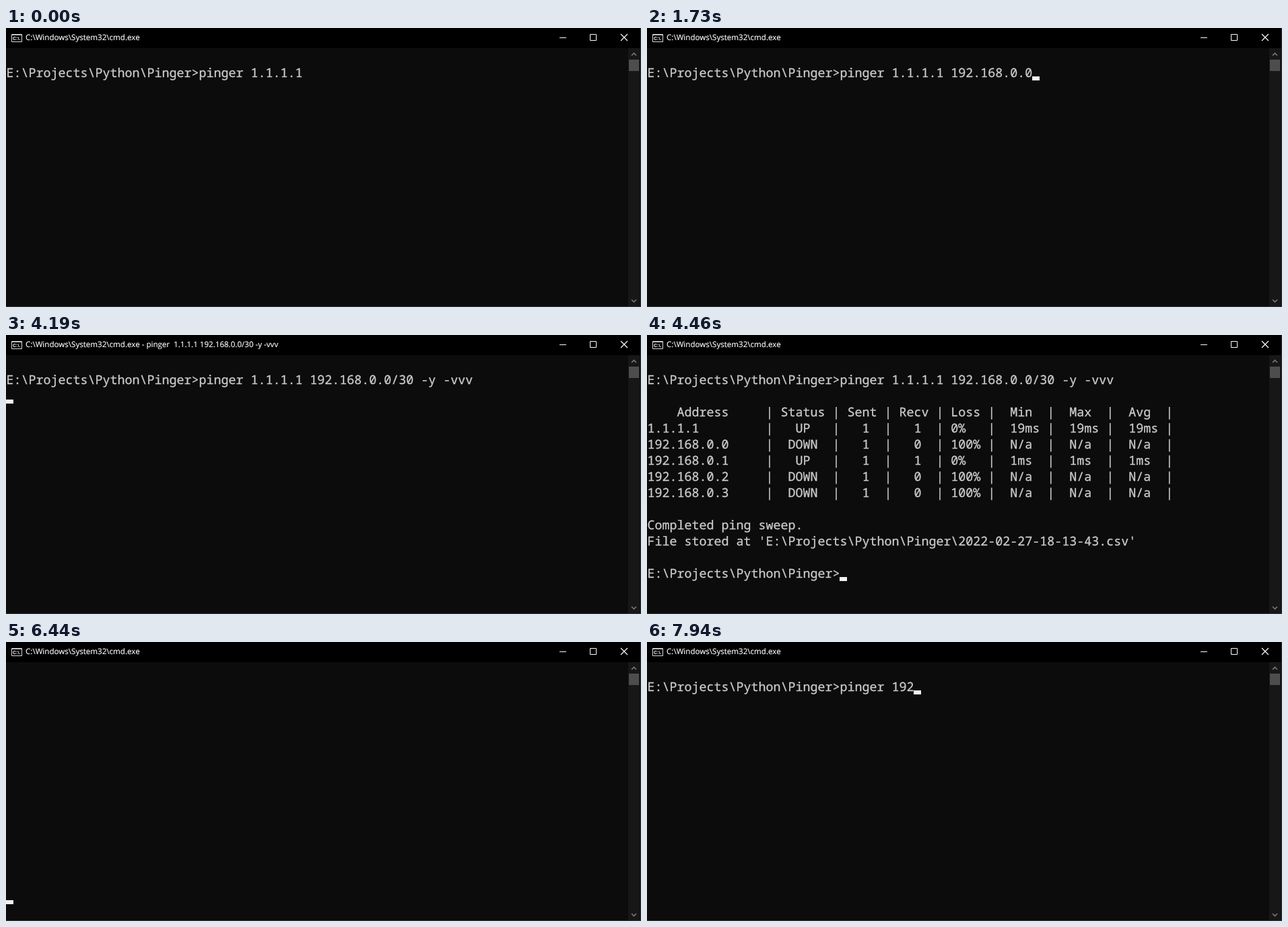
An HTML page for the animation above (8 s loop, 943 px wide and 415 px high).

```html
<!DOCTYPE html>
<html lang="en">
<head>
<meta charset="utf-8">
<title>Console</title>
<style>
  html, body { margin: 0; width: 100%; height: 100%; overflow: hidden; background: #0c0c0c; }
  #bar { position: absolute; left: 0; top: 0; width: 943px; height: 30px; background: #000; }
  #title { position: absolute; left: 29px; top: 0; color: #fff; white-space: pre;
    font: 11.58px/30px "Open Sans", sans-serif; text-rendering: geometricPrecision;
    -webkit-text-stroke: 0.15px #fff; }
  #screen { position: absolute; left: 0.5px; top: 31px; margin: 0; color: #ccc;
    font: 18.333px/24px "Noto Sans Mono", monospace; text-rendering: geometricPrecision;
    -webkit-text-stroke: 0.3px #ccc; }
  #cursor { position: absolute; width: 11px; height: 6px; background: #f2f2f2; }
  svg { position: absolute; left: 0; top: 0; }
</style>
</head>
<body>
<div id="bar"></div>
<div id="title"></div>
<pre id="screen"></pre>
<div id="cursor"></div>
<svg width="943" height="415" fill="none">
  <path d="M8.5 9.5h15v11h-15z" stroke="#ddd"/>
  <path d="M9 10.5h14" stroke="#aaa"/>
  <text x="10" y="18" fill="#fff" font-family="Liberation Sans, sans-serif" font-weight="bold" font-size="7">C:\.</text>
  <path d="M822 14.5h10M867.5 9.5h9v9h-9z" stroke="#fff"/>
  <path d="M913 9l10 10m0-10l-10 10" stroke="#fff" stroke-width="1.2"/>
  <path d="M924 30h17v384h-17z" fill="#171717"/>
  <path d="M925 47h15v17h-15z" fill="#4d4d4d"/>
  <path d="M929 41l3.5-3.5 3.5 3.5M929 404l3.5 3.5 3.5-3.5" stroke="#777" stroke-width="1.6"/>
  <path d="M942.5 0v415M0 414.5h943" stroke="#333"/>
</svg>
<script>
const LOOP = 8000;
const PATH = "E:\\Projects\\Python\\Pinger";
const PROMPT = PATH + ">";
const TITLE = "C:\\Windows\\System32\\cmd.exe";
const SWEEP = "pinger 1.1.1.1 192.168.0.0/30 -y -vvv";

const tableRow = (address, up, time) => {
  const cell = `  ${time.padEnd(5)}|`;
  return address.padEnd(16) + (up ? "|   UP   " : "|  DOWN  ") + "|   1  " +
    (up ? "|   1  | 0%   |" : "|   0  | 100% |") + cell.repeat(3);
};
const REPORT = [
  "", PROMPT + SWEEP, "",
  "    Address     | Status | Sent | Recv | Loss |  Min  |  Max  |  Avg  |",
  tableRow("1.1.1.1", true, "19ms"),
  tableRow("192.168.0.0", false, "N/a"),
  tableRow("192.168.0.1", true, "1ms"),
  tableRow("192.168.0.2", false, "N/a"),
  tableRow("192.168.0.3", false, "N/a"),
  "", "Completed ping sweep.",
  `File stored at '${PATH}\\2022-02-27-18-13-43.csv'`, "", ""
].join("\n");

// Each state: start time, screen text, cursor visible, window title
const states = [];
const add = (time, text, cursor = true, title = TITLE) => states.push({ time, text, cursor, title });

// Steps are [time, typed length]; a negative length hides the cursor
const type = (before, command, steps) => {
  for (const [time, n] of steps) add(time, before + PROMPT + command.slice(0, Math.abs(n)), n > 0);
};

type("\n", SWEEP, [
  [0, -14],
  ...Array.from({ length: 8 }, (_, i) => [150 + Math.round(i * 1030 / 7), 15 + i]),
  [1330, 23], [1450, 24], [1730, 26], [1850, -26], [1985, 27], [2120, 28], [2260, 29], [2390, -29],
  [2670, 31], [2800, 32], [2940, 33], [3220, 34], [3360, 35], [3500, 36], [3640, 37], [3920, -37]
]);
const running = "\n" + PROMPT + SWEEP + "\n";
add(4050, running);
add(4190, running, true, TITLE + " - pinger  " + SWEEP.slice(7));
add(4460, REPORT + PROMPT);
add(5390, REPORT + PROMPT, false);
type(REPORT, "cls", [[5760, 2], [5910, 3]]);
add(6440, "\n".repeat(14));
add(6590, "\n" + PROMPT);
type("\n", "pinger 192", [
  [6870, 2], [7010, 3], [7140, 4], [7420, 6], [7540, 7], [7820, 9], [7940, 10]
]);

const [title, screen, cursor] = ["title", "screen", "cursor"].map(id => document.getElementById(id));
let shown;

function show(state) {
  if (state === shown) return;
  shown = state;
  const lines = state.text.split("\n");
  title.textContent = state.title;
  screen.textContent = state.text;
  cursor.style.left = lines.at(-1).length * 11 + "px";
  cursor.style.top = 24 * lines.length + 24 + "px";
  cursor.style.visibility = state.cursor ? "visible" : "hidden";
}

let start;
function frame(now) {
  start ??= now;
  const t = (now - start) % LOOP;
  show(states.findLast(s => s.time <= t));
  requestAnimationFrame(frame);
}
show(states[0]);
requestAnimationFrame(frame);
</script>
</body>
</html>
```
